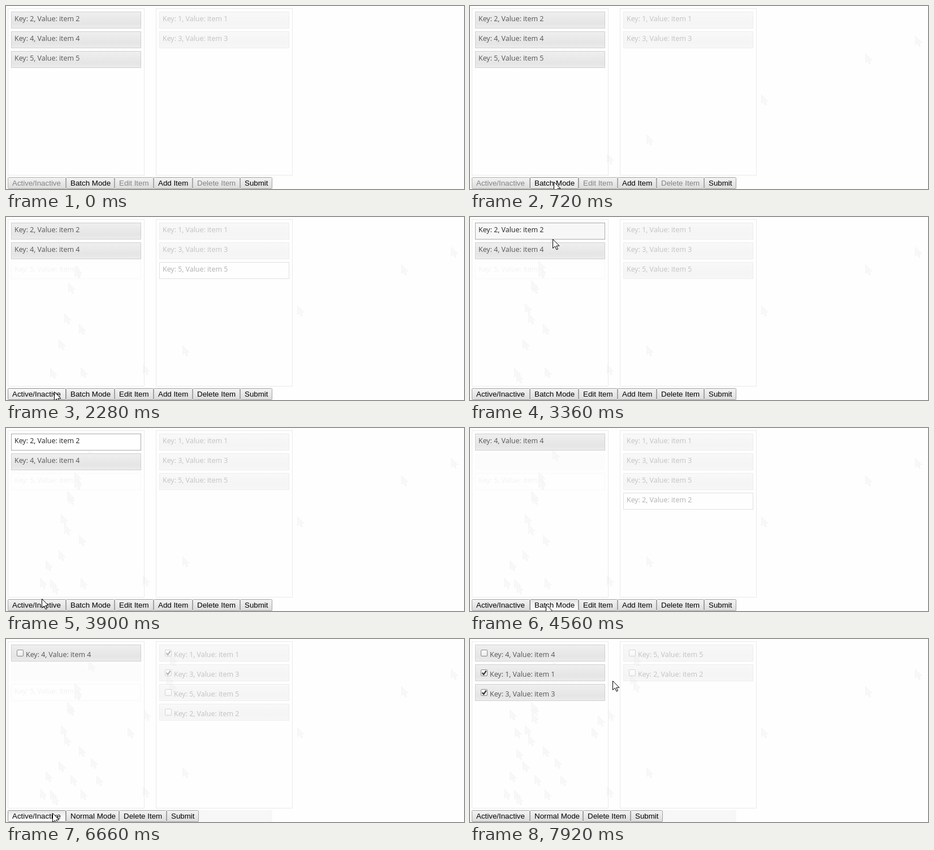
Animation of 810x325 px, one loop 8000 ms. Source, as an HTML page:

```html
<!DOCTYPE html>
<html lang="en">
<head>
<meta charset="utf-8">
<title>Item lists</title>
<style>
html, body { margin: 0; width: 100%; height: 100%; overflow: hidden; background: #fefefe; }
svg { display: block; }
.row text { font: 12.45px "Open Sans", "Noto Sans", sans-serif; fill: #555; }
.row rect { stroke: #d0d0d0; fill: url(#glass); }
.row.on rect { stroke: #aaa; fill: #fff; }
.row.soft rect { fill: #f7f7f7; }
.row.on text { fill: #212121; }
.row.faded rect { stroke: #f8f8f8; fill: #fefefe; }
.row.faded text { fill: #f2f2f2; }
.row .box { fill: url(#check); stroke: #8a8a8a; }
.row .tick { fill: none; stroke: #333; stroke-width: 2.2; }
.dim { opacity: .35; }
.panel { fill: none; stroke: #e9eaea; }
.btn rect { fill: url(#face); stroke: #a3a3a3; }
.btn text { font: 13.333px "Liberation Sans", Arial, sans-serif; fill: #000; }
.btn.hover rect { fill: url(#hover); stroke: #8f8f8f; }
.btn.down rect { fill: url(#down); stroke: #8f8f8f; }
.btn.off rect { stroke: #b0b0b0; }
.btn.off text { fill: #838383; }
.trail { fill: #f8f8f8; stroke: #f5f5f5; }
.arrow { fill: #fff; stroke: #000; }
.beam { fill: none; stroke: #000; }
</style>
</head>
<body>
<svg width="810" height="325" viewBox="0 0 810 325">
  <defs>
    <linearGradient id="glass" x2="0" y2="1"><stop stop-color="#efefef"/><stop offset=".7" stop-color="#e5e5e5"/><stop offset="1" stop-color="#ececec"/></linearGradient>
    <linearGradient id="check" x2="0" y2="1"><stop stop-color="#fff"/><stop offset="1" stop-color="#e8e8e8"/></linearGradient>
    <linearGradient id="face" x2="0" y2="1"><stop stop-color="#f3f3f3"/><stop offset="1" stop-color="#dcdcdc"/></linearGradient>
    <linearGradient id="hover" x2="0" y2="1"><stop stop-color="#f8f8f8"/><stop offset="1" stop-color="#e4e4e4"/></linearGradient>
    <linearGradient id="down" x2="0" y2="1"><stop stop-color="#e4e4e4"/><stop offset=".5" stop-color="#f6f6f6"/><stop offset="1" stop-color="#fafafa"/></linearGradient>
  </defs>
  <g id="stage"></g>
</svg>
<script>
const LOOP = 8000, STEP = 60;
const stage = document.getElementById('stage');

// each scene changes part of the state from its time on
const scenes = [];
const scene = (at, change) => scenes.push({ at, change });
scene(0, { left: [2, 4, 5], right: [1, 3], checked: [] });
scene(1440, { sel: 5 });
scene(2160, { down: true });
scene(2280, { left: [2, 4], right: [1, 3, 5], down: false });
scene(3360, { sel: 2, soft: true });
scene(3420, { soft: false });
scene(4020, { down: true });
scene(4140, { left: [4], right: [1, 3, 5, 2], down: false });
scene(4560, { down: true });
scene(4680, { batch: true, sel: 0, down: false });
scene(5520, { checked: [1] });
scene(5940, { checked: [1, 3] });
scene(6660, { down: true });
scene(6840, { left: [4, 1, 3], right: [5, 2], down: false });

const stateAt = t => Object.assign({}, ...scenes.filter(s => s.at <= t).map(s => s.change));

// pointer: one stop per step, the last one reached after an extra glide
const path = [];
function move(at, glide, ...xy) {
  const n = xy.length / 2, prev = path[path.length - 1];
  if (prev) path.push({ ...prev, t: at - STEP });
  for (let i = 0; i < n; i++) {
    path.push({ t: at + i * STEP + (i === n - 1 ? glide : 0), x: xy[2 * i], y: xy[2 * i + 1] });
  }
}
move(240, 120, 787, 53, 699, 84, 515, 157, 312, 228, 242, 262, 160, 306, 148, 312);
move(960, 60, 132, 267, 129, 190, 122, 87);
move(1560, 180, 121, 90, 110, 117, 103, 171, 93, 217, 78, 268, 85, 310);
move(2520, 360, 82, 276, 97, 153, 108, 112, 121, 78, 146, 39);
move(3540, 240, 108, 112, 70, 235, 60, 266, 64, 312);
move(4200, 300, 134, 313);
move(4860, 0, 160, 242, 215, 157, 289, 75);
move(5040, 300, 290, 29);
move(5580, 120, 284, 64);
move(6000, 120, 244, 126, 150, 211, 114, 241, 82, 309);
move(7380, 120, 82, 195, 79, 157, 70, 125, 109, 131, 226, 136, 252, 74);

function pointerAt(t) {
  const i = path.findIndex(p => p.t > t);
  if (i === 0) return null;
  if (i < 0) return path[path.length - 1];
  const a = path[i - 1], b = path[i], k = (t - a.t) / (b.t - a.t);
  return { x: Math.round(a.x + (b.x - a.x) * k), y: Math.round(a.y + (b.y - a.y) * k) };
}

const mark = (cls, { x, y }, d) =>
  `<path class="${cls}" transform="translate(${x + .5} ${y + .5})" d="${d}"/>`;
const arrow = (p, cls) => mark(cls, p, 'M0 0V16L4 12.5 6.5 18.5 9 17.4 6.4 11.7H11.5Z');
const beam = p => mark('beam', p, 'M-3 -8H-1L0 -7 1 -8H3M0 -7V7M-3 8H-1L0 7 1 8H3');

function row(x, i, key, s, cls = '') {
  const y = 10 + 35 * i;
  if (s.sel === key && !cls) cls = s.soft ? 'on soft' : 'on';
  let box = '';
  if (s.batch && cls !== 'faded') {
    box = `<rect class="box" x="${x + 10.5}" y="${y + 9.5}" width="11" height="11" rx="1.5"/>`;
    if (s.checked.includes(key)) box += `<path class="tick" d="M${x + 12.5} ${y + 15}l2.7 3 4.5 -6.5"/>`;
  }
  const dx = box ? 26 : 6, dy = box ? 22 : 17;
  return `<g class="row ${cls}"><rect x="${x + .5}" y="${y + .5}" width="229" height="29"/>${box}` +
    `<text x="${x + dx}" y="${y + dy}">Key: ${key}, Value: item ${key}</text></g>`;
}

const widths = {
  'Active/Inactive': 103, 'Batch Mode': 86, 'Normal Mode': 94,
  'Edit Item': 69, 'Add Item': 69, 'Delete Item': 84, 'Submit': 57
};
const needsItem = /Active|Edit|Delete/;

function bar(s, pos) {
  const ready = s.sel || s.checked.length;
  let x = 3;
  return Object.keys(widths).filter(label => !(s.batch ? /Batch|Edit|Add/ : /Normal/).test(label)).map(label => {
    const w = widths[label];
    const over = pos && pos.y >= 304 && pos.x >= x && pos.x < x + w;
    const cls = needsItem.test(label) && !ready ? 'off' : over ? (s.down ? 'down' : 'hover') : '';
    const out = `<g class="btn ${cls}"><rect x="${x + .5}" y="304.5" width="${w - 1}" height="20" rx="1"/>` +
      `<text x="${x + 8}" y="319">${label}</text></g>`;
    x += w;
    return out;
  }).join('');
}

function draw(t) {
  const s = stateAt(t), pos = pointerAt(t);
  let out = '';
  if (s.left.length < 3) out += row(9, 2, 5, s, 'faded');
  if (s.left.length < 2) out += '<rect x="9" y="45" width="230" height="30" fill="#fcfcfc"/>';
  if (s.batch) out += '<rect x="341" y="304" width="130" height="21" fill="#f7f7f7"/>';
  out += path.filter(p => p.t < t).map(p => arrow(p, 'trail')).join('');
  for (const x of [3.5, 265.5]) out += `<rect class="panel" x="${x}" y="4.5" width="241" height="296"/>`;
  out += s.left.map((key, i) => row(9, i, key, s)).join('');
  out += `<g class="dim">${s.right.map((key, i) => row(271, i, key, s)).join('')}</g>`;
  out += bar(s, pos);
  if (pos) out += t >= 1140 && t < 1620 ? beam(pos) : arrow(pos, 'arrow');
  stage.innerHTML = out;
}

let last = -1;
const start = performance.now();
function tick() {
  const t = Math.floor((performance.now() - start) % LOOP / STEP) * STEP;
  if (t !== last) draw(last = t);
  requestAnimationFrame(tick);
}
tick();
</script>
</body>
</html>
```
